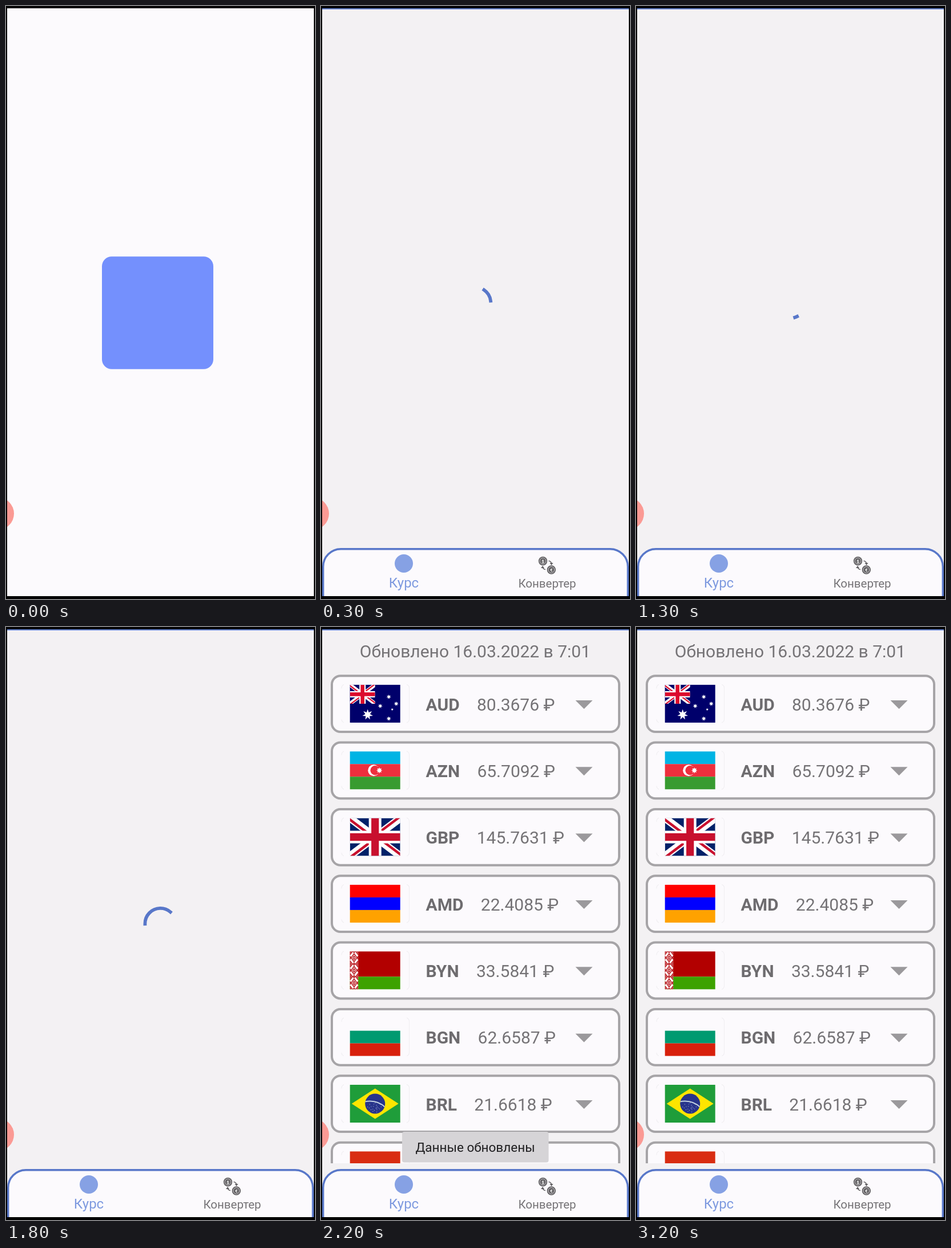
Write an HTML page with a canvas that moves like this. It is 541x1035 px and loops after 3300 ms.

```html
<!DOCTYPE html>
<html lang="ru">
<head>
<meta charset="utf-8">
<title>Курс</title>
<style>
  html, body { margin: 0; width: 100%; height: 100%; overflow: hidden; background: #000; }
  canvas { display: block; width: 541px; height: 1035px; }
</style>
</head>
<body>
<canvas id="stage" width="541" height="1035"></canvas>
<script>
const ctx = document.getElementById('stage').getContext('2d');
const LOOP = 3300, STEP = 100, TAU = Math.PI * 2, RAD = Math.PI / 180;
const PAPER = '#fcfafd', BACK = '#f3f1f3', BLUE = '#5877c9', GREY = '#757376';
const FONT = 'Roboto, "Noto Sans", sans-serif';

function rect(x, y, w, h, color) {
  ctx.fillStyle = color;
  ctx.fillRect(x, y, w, h);
}

function rounded(x, y, w, h, r, fill, stroke, width) {
  ctx.beginPath();
  ctx.roundRect(x, y, w, h, r);
  if (fill) { ctx.fillStyle = fill; ctx.fill(); }
  if (stroke) { ctx.strokeStyle = stroke; ctx.lineWidth = width; ctx.stroke(); }
}

function disc(x, y, r, color) {
  ctx.fillStyle = color;
  ctx.beginPath();
  ctx.arc(x, y, r, 0, TAU);
  ctx.fill();
}

function arc(x, y, r, from, to, color, width) {
  ctx.strokeStyle = color;
  ctx.lineWidth = width;
  ctx.beginPath();
  ctx.arc(x, y, r, from * RAD, to * RAD);
  ctx.stroke();
}

function poly(points, color) {
  ctx.fillStyle = color;
  ctx.beginPath();
  points.forEach(([x, y]) => ctx.lineTo(x, y));
  ctx.closePath();
  ctx.fill();
}

function star(x, y, r, n, inner) {
  const points = [];
  for (let i = 0; i < n * 2; i++) {
    const a = i * Math.PI / n - Math.PI / 2, d = i % 2 ? r * inner : r;
    points.push([x + d * Math.cos(a), y + d * Math.sin(a)]);
  }
  poly(points, '#fff');
}

function text(str, x, y, size, color, align = 'left', weight = 400) {
  ctx.font = `${weight} ${size}px ${FONT}`;
  ctx.textAlign = align;
  ctx.fillStyle = color;
  ctx.fillText(str, x, y);
}

// Flags are drawn in an 88 by 66 box.
const W = 88, H = 66;

function bands(...colors) {
  const h = H / colors.length;
  colors.forEach((c, i) => rect(0, i * h, W, h, c));
}

function union(w, h, navy, red) {
  const saltire = (color, width) => {
    ctx.strokeStyle = color;
    ctx.lineWidth = width;
    ctx.beginPath();
    ctx.moveTo(0, 0); ctx.lineTo(w, h);
    ctx.moveTo(w, 0); ctx.lineTo(0, h);
    ctx.stroke();
  };
  const cross = (color, t) => {
    rect((w - t) / 2, 0, t, h, color);
    rect(0, (h - t) / 2, w, t, color);
  };
  ctx.save();
  ctx.beginPath();
  ctx.rect(0, 0, w, h);
  ctx.clip();
  rect(0, 0, w, h, navy);
  saltire('#fff', h / 5);
  ctx.save();
  ctx.beginPath();
  const cx = w / 2, cy = h / 2;
  [[w, cy, w, h], [cx, h, 0, h], [0, cy, 0, 0], [cx, 0, w, 0]].forEach(([ax, ay, bx, by]) => {
    ctx.moveTo(cx, cy); ctx.lineTo(ax, ay); ctx.lineTo(bx, by); ctx.closePath();
  });
  ctx.clip();
  saltire(red, h * 2 / 15);
  ctx.restore();
  cross('#fff', h / 3);
  cross(red, h / 5);
  ctx.restore();
}

function australia() {
  rect(0, 0, W, H, '#00006b');
  union(W / 2, H / 2, '#00006b', '#dc0a2c');
  star(31, 52, 9.5, 7, 0.45);
  [[68, 21], [53, 37], [81, 33], [68, 59]].forEach(([x, y]) => star(x, y, 4.2, 7, 0.45));
  star(74, 43, 2.4, 5, 0.45);
}

function azerbaijan() {
  bands('#00b4e4', '#ee2f3d', '#389b30');
  disc(41.5, 33, 10, '#fff');
  disc(44, 33, 8.3, '#ee2f3d');
  star(51.5, 33, 5.3, 8, 0.55);
}

function diamond(x, y, rx, ry) {
  ctx.beginPath();
  ctx.moveTo(x, y - ry); ctx.lineTo(x + rx, y);
  ctx.lineTo(x, y + ry); ctx.lineTo(x - rx, y);
  ctx.closePath();
  ctx.stroke();
}

function belarus() {
  rect(0, 0, W, 44, '#b20000');
  rect(0, 44, W, 22, '#3da200');
  rect(0, 0, 14.5, H, '#fff');
  ctx.save();
  ctx.beginPath();
  ctx.rect(0, 0, 14.5, H);
  ctx.clip();
  ctx.strokeStyle = '#b8161c';
  ctx.lineWidth = 1.5;
  for (let y = 0; y <= H; y += 22) {
    diamond(7.2, y + 11, 5.2, 7);
    diamond(7.2, y + 11, 2, 3);
    diamond(7.2, y, 1.6, 2);
    for (const x of [0.5, 14]) {
      diamond(x, y, 4, 5);
      diamond(x, y, 1.5, 2);
      diamond(x, y + 11, 1, 2);
    }
  }
  ctx.restore();
}

function brazil() {
  rect(0, 0, W, H, '#1f9d3a');
  poly([[3, 33], [44, 6.5], [85, 33], [44, 59.5]], '#fde500');
  disc(44, 33, 17.5, '#27348b');
  ctx.save();
  ctx.beginPath();
  ctx.arc(44, 33, 17.5, 0, TAU);
  ctx.clip();
  arc(35, 67, 38.5, 180, 360, '#c3d2e2', 2);
  for (let i = 0; i < 22; i++) {
    const a = i * 2.4, d = 3 + (i * 5.3) % 12;
    disc(43 + d * Math.cos(a), 40 + d * Math.sin(a) * 0.6, 0.55, '#cfd6ee');
  }
  ctx.restore();
}

const ROWS = [
  ['AUD', '80.3676', australia],
  ['AZN', '65.7092', azerbaijan],
  ['GBP', '145.7631', () => union(W, H, '#012169', '#c8102e')],
  ['AMD', '22.4085', () => bands('#ff0000', '#0000ff', '#ffa200')],
  ['BYN', '33.5841', belarus],
  ['BGN', '62.6587', () => bands(PAPER, '#009a70', '#d8200c')],
  ['BRL', '21.6618', brazil],
  ['', '', () => rect(0, 0, W, H, '#d92d12')]
];

function row([code, rate, flag], i) {
  const y = 83.2 + i * 116.35;
  rounded(19, y + 2, 503, 97.8, 15, PAPER, '#a6a4a7', 4);
  rounded(36, y + 17, 118.5, 67, 6, null, '#f1eff2', 1.2);
  rect(40, y + 15, 110, 4, PAPER);
  rect(40, y + 82, 110, 4, PAPER);
  rect(34, y + 24, 4, 54, PAPER);
  ctx.save();
  ctx.translate(50.7, y + 17.7);
  flag();
  ctx.restore();
  if (!code) return;
  text(code, 183.5, y + 62.4, 30, '#6e6c6f', 'left', 700);
  const x = 183.5 + ctx.measureText(code).width + 30.3;
  text(rate + ' ₽', x, y + 62.4, 30, GREY);
  poly([[445.5, y + 44.7], [475.5, y + 44.7], [460.5, y + 59.7]], '#9b999c');
}

function list() {
  ctx.save();
  ctx.beginPath();
  ctx.rect(2, 6, 537, 930);
  ctx.clip();
  text('Обновлено 16.03.2022 в 7:01', 269.9, 52.5, 30, GREY, 'center');
  ROWS.forEach(row);
  ctx.restore();
}

function coin(x, y, sign) {
  disc(x, y, 7.7, '#626063');
  arc(x, y, 5.4, 0, 360, '#dddbde', 0.9);
  text(sign, x, y + 2.8, 8, '#fff', 'center', 700);
}

function tabs() {
  rounded(3.7, 947.7, 533.6, 130, 31, PAPER, BLUE, 3.4);
  disc(145, 973, 16, '#86a1e4');
  text('Курс', 145, 1015, 24, '#7d99df', 'center');
  coin(388.5, 968.7, '$');
  coin(403.3, 984, '€');
  arc(398.5, 973.5, 5, -90, 0, '#626063', 1.6);
  poly([[400.5, 972], [406.5, 972], [403.5, 976]], '#626063');
  arc(393, 978.5, 5, 90, 180, '#626063', 1.6);
  poly([[385, 981], [391, 981], [388, 977]], '#626063');
  text('Конвертер', 396, 1015, 20.5, GREY, 'center');
}

// Eases x through a cubic segment given its control points.
function bezier(u, x0, y0, x1, y1, x2, y2, x3, y3) {
  const at = (s, a, b, c, d) =>
    a * (1 - s) ** 3 + 3 * b * s * (1 - s) ** 2 + 3 * c * s * s * (1 - s) + d * s ** 3;
  let lo = 0, hi = 1;
  for (let i = 0; i < 24; i++) {
    const mid = (lo + hi) / 2;
    if (at(mid, x0, x1, x2, x3) < u) lo = mid; else hi = mid;
  }
  return at(lo, y0, y1, y2, y3);
}

const head = u => u < 0.5
  ? bezier(u, 0, 0, 0.2, 0, 0.1, 1, 0.5, 0.96)
  : bezier(u, 0.5, 0.96, 0.966, 0.96, 0.993, 1, 1, 1);
const tail = u => u < 0.5 ? 0 : bezier(u, 0.5, 0, 0.7, 0, 0.6, 1, 1, 1);

function spinner(t) {
  const age = t < 800 ? 150 + (t - 300) * 1.11 : 705 + (t - 800) * 0.859;
  if (age < 0) return;
  const cycle = Math.floor(age / 1333), u = age / 1333 - cycle;
  const base = -90 + age * (90 / 1333 + 720 / 4444) + cycle * 270;
  ctx.lineCap = 'square';
  arc(270.3, 517.8, 26.9, base + 270 * tail(u), base + 270 * head(u) + 0.1, BLUE, 5.8);
  ctx.lineCap = 'butt';
}

function toast(alpha) {
  if (alpha <= 0) return;
  ctx.globalAlpha = alpha;
  rounded(142, 881, 256.5, 53.5, 4, '#d6d4d7');
  text('Данные обновлены', 270, 916, 22.5, '#1f1e20', 'center');
  ctx.globalAlpha = 1;
}

function splash(alpha) {
  ctx.globalAlpha = alpha;
  rect(2, 4, 537, 1026, PAPER);
  rounded(168, 437.3, 195, 196.5, 17, '#7490fd');
  ctx.globalAlpha = 1;
}

const clamp = v => Math.max(0, Math.min(1, v));

function draw(t) {
  rect(0, 0, 541, 1035, '#000');
  ctx.save();
  ctx.beginPath();
  ctx.rect(2, 4, 537, 1026);
  ctx.clip();
  if (t < 100) {
    splash(1);
  } else {
    rect(2, 4, 537, 1026, BACK);
    if (t < 1900) spinner(t); else list();
    rect(2, 4, 537, 2, '#6a87d3');
    tabs();
    toast(Math.min(clamp((t - 1900) / 300), clamp((3200 - t) / 300)));
    if (t < 200) splash(0.5);
  }
  disc(-14, 886, 28, '#fb9a94');
  ctx.restore();
}

const start = performance.now();
function tick() {
  const t = (performance.now() - start) % LOOP;
  draw(Math.floor(t / STEP) * STEP);
  requestAnimationFrame(tick);
}
tick();
</script>
</body>
</html>
```
